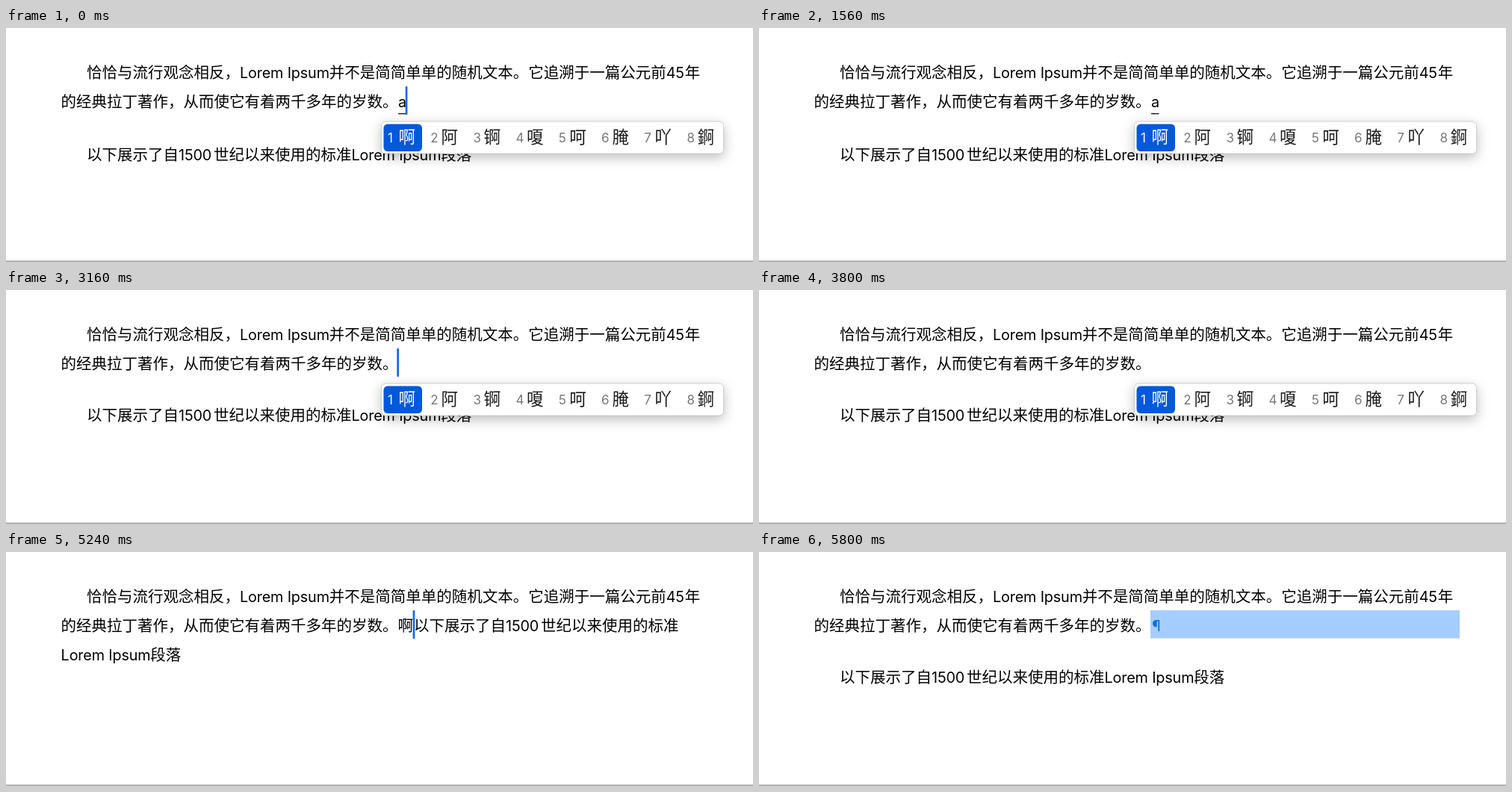
An HTML page for the animation above (6.3 s loop, 1000 px wide and 313 px high).

```html
<!DOCTYPE html>
<html lang="zh-CN">
<head>
<meta charset="utf-8">
<style>
  html, body { margin: 0; width: 100%; height: 100%; overflow: hidden; background: #fff; }
  svg { display: block; width: 100%; height: 100%; }
  text { font-family: "Noto Sans CJK SC", "Noto Sans CJK", sans-serif; white-space: pre; }
  text.latin { font-family: Inter, sans-serif; letter-spacing: -.15px; }
  #popup { filter: drop-shadow(0 5px 8px rgba(0, 0, 0, .26)); }
</style>
</head>
<body>
<svg id="stage" viewBox="0 0 1000 313" preserveAspectRatio="none"></svg>
<script>
const LOOP = 6300;
const HAN = 20.5;
const LATIN_ADVANCE = { 'Lorem Ipsum': 119.7, '45': 25, '1500': 47 };
const INDENT = 108, MARGIN = 73.6, LINE_END = 524.6;
const BLUE = '#0b6fe0';

const stage = document.getElementById('stage');

function add(parent, tag, attrs = {}, content = '') {
  const node = document.createElementNS('http://www.w3.org/2000/svg', tag);
  for (const key in attrs) node.setAttribute(key, attrs[key]);
  node.textContent = content;
  return parent.appendChild(node);
}

const group = (parent = stage, attrs) => add(parent, 'g', attrs);
const rect = (parent, x, y, width, height, fill, rx = 0, extra = {}) =>
  add(parent, 'rect', { x, y, width, height, fill, rx, ...extra });
const han = (parent, x, y, size, fill, content) =>
  add(parent, 'text', { x, y, fill, 'font-size': size }, content);
const latin = (parent, x, y, size, fill, content) =>
  add(parent, 'text', { x, y, fill, 'font-size': size, class: 'latin' }, content);

// Sets mixed text run by run, Chinese on its square grid.
function flow(parent, x, y, content) {
  for (const run of content.match(/[ -~]+|[^ -~]+/g)) {
    if (run in LATIN_ADVANCE) {
      latin(parent, x, y, 19.8, '#000', run);
      x += LATIN_ADVANCE[run];
    } else {
      han(parent, x, y, HAN, '#000', run);
      x += run.length * HAN;
    }
  }
}

const selection = group();
rect(selection, 524, 78, 414, 37.5, '#a5cdff');
latin(selection, 526, 106, 19.8, BLUE, '¶');

const body = group();
flow(body, INDENT, 66.5, '恰恰与流行观念相反，Lorem Ipsum并不是简简单单的随机文本。它追溯于一篇公元前45年');
flow(body, MARGIN, 106, '的经典拉丁著作，从而使它有着两千多年的岁数。');

const second = group();
flow(second, INDENT, 175.2, '以下展示了自1500世纪以来使用的标准Lorem Ipsum段落');

const merged = group();
flow(merged, LINE_END, 106, '啊');
flow(merged, 546, 106, '以下展示了自1500世纪以来使用的标准');
flow(merged, MARGIN, 145.4, 'Lorem Ipsum段落');

const composing = group();
latin(composing, 525, 106, 19.8, '#000', 'a');
rect(composing, 525, 114, 10.5, 1.3, '#111');

const popup = group(stage, { id: 'popup' });
rect(popup, 502.5, 125, 458, 43, '#fff', 5.5, { stroke: '#c4c4c4', 'stroke-width': .8 });
rect(popup, 505.5, 128.5, 51.5, 36.5, '#0058db', 5.5);
[...'啊阿锕嗄呵腌吖錒'].forEach((glyph, i) => {
  const shift = i * 57.2;
  latin(popup, 511 + shift, 152.6, 17, i ? '#777' : '#fff', i + 1);
  han(popup, 525.4 + shift, 154.4, 22.5, i ? '#1c1c1c' : '#fff', glyph);
});

const caret = rect(stage, 0, 78, 2.7, 38, BLUE, 1);
rect(stage, 0, 311.5, 1000, 1, '#666');

// The caret toggles at each listed time, starting visible.
const scenes = [
  { start: 0, caretX: 534.7, blinks: [260, 920, 1560], parts: [composing, second, popup], drop: 1.8 },
  { start: 1920, caretX: 523.3, blinks: [2520, 3160, 3800], parts: [second, popup] },
  { start: 3980, caretX: 544.6, blinks: [4620, 5240], parts: [merged] },
  { start: 5680, parts: [selection, second] },
];
const parts = [selection, second, merged, composing, popup];
const show = (node, on) => node.setAttribute('visibility', on ? 'visible' : 'hidden');

function render(time) {
  const scene = scenes.findLast(s => time >= s.start);
  for (const part of parts) show(part, scene.parts.includes(part));
  second.setAttribute('transform', `translate(0 ${scene.drop || 0})`);

  const toggles = (scene.blinks || []).filter(t => time >= t).length;
  show(caret, scene.blinks && toggles % 2 === 0);
  caret.setAttribute('x', scene.caretX || 0);
}

const origin = performance.now();
function tick() {
  render((performance.now() - origin) % LOOP);
  requestAnimationFrame(tick);
}
tick();
</script>
</body>
</html>
```
